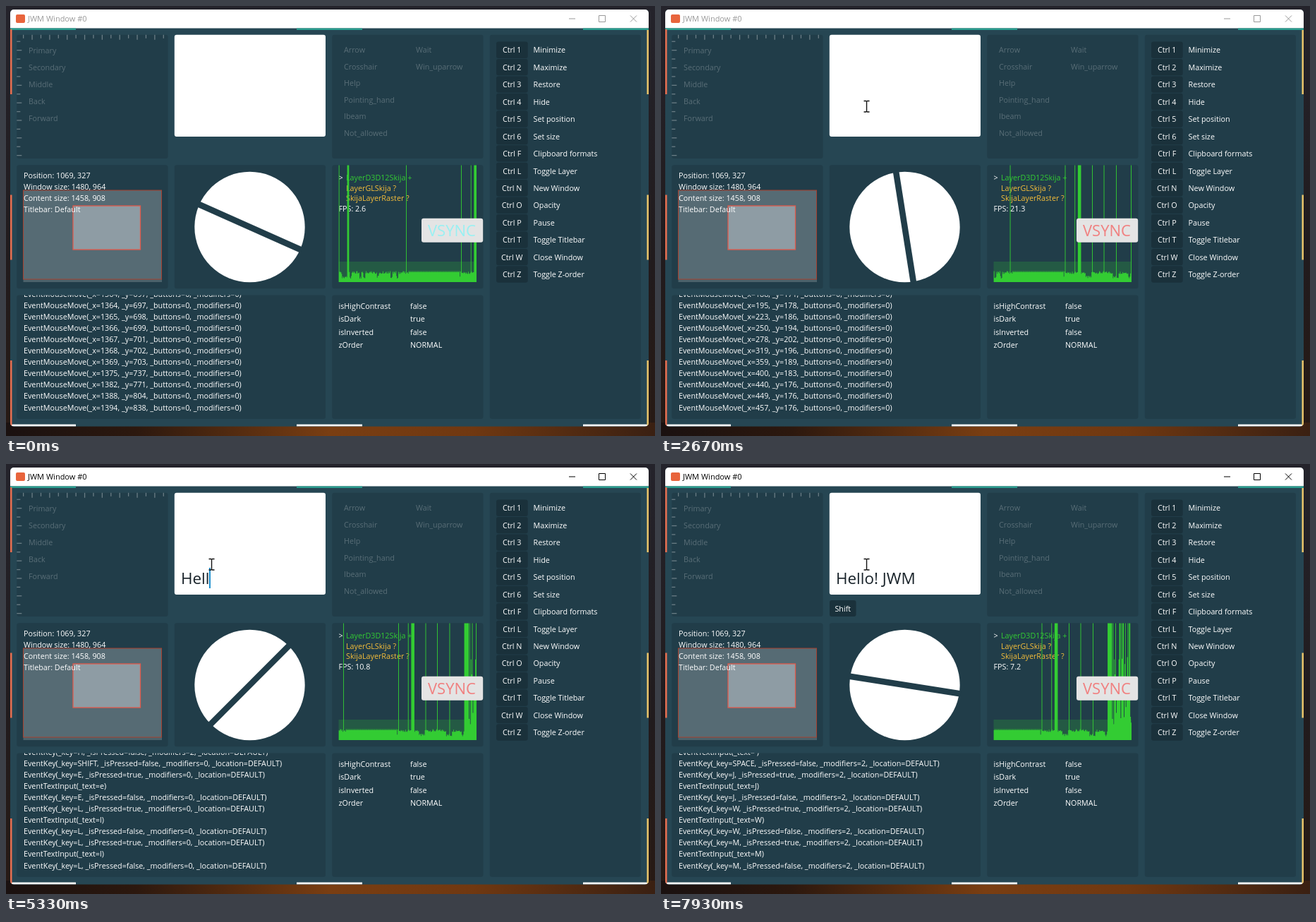
Recreate the animation shown at these times as an HTML page. Size 920 by 609 pixels, loop 8 s.

```html
<!DOCTYPE html>
<html lang="en">
<head>
<meta charset="utf-8">
<title>JWM Window</title>
<style>
html, body { margin: 0; width: 100%; height: 100%; overflow: hidden; background: #1d1c24; }
svg { display: block; }
text { font: 10.75px "Open Sans", "Noto Sans", sans-serif; fill: #fff; white-space: pre; font-variant-ligatures: none; }
.dim text, text.dim { fill-opacity: .25; }
text.big { font-size: 22.4px; }
</style>
</head>
<body>
<svg id="stage" width="920" height="609" viewBox="0 0 920 609"></svg>
<script>
const LOOP = 8000, SCALE = 0.6207, LEFT = 6, TOP = 31.5;
const PANEL = '#213d49', TAG = '#1a313b';
const stage = document.getElementById('stage');

const rect = (x, y, w, h, fill, r = 0, extra = '') =>
  `<rect x="${x}" y="${y}" width="${w}" height="${h}" rx="${r}" fill="${fill}" ${extra}/>`;
const label = (x, y, s, extra = '') => `<text x="${x}" y="${y}" ${extra}>${s}</text>`;
const column = (x, y, step, items) => items.map((s, i) => label(x, y + i * step, s)).join('');
const times = (n, f) => Array.from({ length: n }, (_, i) => f(i)).join('');
const random = k => { const v = Math.sin(k * 12.9898) * 43758.5453; return v - Math.floor(v); };

// Linear interpolation through rows of [position, ...values].
function track(rows, at) {
  let i = 1;
  while (i < rows.length - 1 && rows[i][0] < at) i++;
  const a = rows[i - 1], b = rows[i];
  const p = Math.min(1, Math.max(0, (at - a[0]) / (b[0] - a[0])));
  return a.slice(1).map((v, j) => v + (b[j + 1] - v) * p);
}

// ---- Static window ----
const shortcuts = ['1 Minimize', '2 Maximize', '3 Restore', '4 Hide', '5 Set position', '6 Set size',
  'F Clipboard formats', 'L Toggle Layer', 'N New Window', 'O Opacity', 'P Pause',
  'T Toggle Titlebar', 'W Close Window', 'Z Toggle Z-order'];

const panel = (col, row, cols = 1, rows = 1) => rect(15.3 + col * 223.5, 40.8 + row * 184.4,
  cols * 223.5 - 9.3, rows * 184.4 - 9.3, PANEL, 3);

const edges = times(3, i => {
  const x = 6 + i * 406, y = 33 + i * 234.5;
  return rect(x, TOP, 93, 2.5, '#2a9d8f') + rect(x, 592.5, 93, 3, '#fff') +
    rect(6, y, 2.5, 92, '#e76f51') + rect(908.5, y, 2.5, 92, '#e9c46a');
});

const tick = 20 * SCALE;
const ruler = '<g fill-opacity=".33">' +
  times(17, i => rect(24 + i * tick, 40.8, 1.3, i % 2 ? 7 : 5, '#fff')) +
  times(14, i => rect(15.3, 49.6 + i * tick, i % 2 ? 7 : 5, 1.3, '#fff')) + '</g>';

stage.innerHTML = `
<defs>
  <linearGradient id="sky" x2="0" y2="1">
    <stop offset="0" stop-color="#24232b"/><stop offset=".6" stop-color="#211b1d"/><stop offset="1" stop-color="#281a14"/>
  </linearGradient>
  <linearGradient id="glow">
    <stop offset="0" stop-color="#1a1110"/><stop offset=".2" stop-color="#2c180e"/><stop offset=".5" stop-color="#7a3e12"/>
    <stop offset=".72" stop-color="#703811"/><stop offset="1" stop-color="#3a2012"/>
  </linearGradient>
  <clipPath id="frame"><rect x="6" y="5" width="905" height="590.5" rx="5"/></clipPath>
  <clipPath id="logClip"><rect x="15" y="409.5" width="438" height="175"/></clipPath>
</defs>
${rect(0, 0, 920, 609, 'url(#sky)')}${rect(0, 590, 920, 19, 'url(#glow)')}
<g clip-path="url(#frame)">
  ${rect(6, 5, 905, 591, '#264653')}${rect(6, 5, 905, TOP - 5, '#fff')}${edges}
</g>
${rect(14, 12, 13, 12, '#e8643c', 2)}
<g id="title">
  <text x="31" y="22" style="font-size:11px;fill:currentColor">JWM Window #0</text>
  <path d="M798 18h9M840.5 13.5h9v9h-9zM885 13.5l9 9m0-9l-9 9" fill="none" stroke="currentColor"/>
</g>
${panel(0, 0)}${panel(2, 0)}${panel(0, 1)}${panel(1, 1)}${panel(2, 1)}
${panel(0, 2, 2)}${panel(2, 2)}${panel(3, 0, 1, 3)}
${ruler}
<g class="dim">
  ${column(32, 66.5, 24.15, ['Primary', 'Secondary', 'Middle', 'Back', 'Forward'])}
  ${column(479, 66, 23.6, ['Arrow', 'Crosshair', 'Help', 'Pointing_hand', 'Ibeam', 'Not_allowed'])}
  ${column(581, 66, 23.6, ['Wait', 'Win_uparrow'])}
</g>
<g id="cross">
  <path id="crossLines" fill="none" stroke="#fff" stroke-opacity=".33" stroke-width="2"/>
  <text id="crossLabel" class="dim"></text>
</g>
${rect(238.8, 40.8, 214.2, 144.2, '#fff', 3)}
<text id="typed" class="big" x="248" y="170" style="fill:#182229"></text>
<rect id="caret" y="147" width="2" height="29" fill="#1a8fcf"/>
<g id="tags"></g>
${rect(24.5, 261, 196.5, 130, '#fff', 0, 'fill-opacity=".19"')}
${rect(24.5, 261, 196, 126, '#fff', 0, 'fill-opacity=".06" stroke="#a8412f"')}
${rect(95, 283, 95.5, 62, '#8e9ca4', 0, 'stroke="#e05a4c" stroke-width="1.3"')}
${column(25, 243.5, 16.05, ['Position: 1069, 327', 'Window size: 1480, 964', 'Content size: 1458, 908', 'Titlebar: Default'])}
<circle cx="345.5" cy="313" r="78.2" fill="#fff"/>
<path id="slot" d="M265 313h161" stroke="${PANEL}" stroke-width="8.6"/>
${label(471.5, 246.5, '&gt;')}
${label(482, 246.5, 'LayerD3D12Skija +', 'style="fill:#3c3"')}
${label(482, 261.5, 'LayerGLSkija ?', 'style="fill:#f4bd3a"')}
${label(482, 276.3, 'SkijaLayerRaster ?', 'style="fill:#f4bd3a"')}
<text id="fps" x="471.5" y="291"></text>
${rect(471.5, 362, 195.5, 29, '#3c3', 0, 'fill-opacity=".2"')}
<path id="bars" fill="#3c3"/>
${rect(589, 300.7, 87.2, 34, '#e4e4e4', 3)}
<text id="vsync" class="big" x="598" y="325.5" style="font-size:22px">VSYNC</text>
<g id="log" clip-path="url(#logClip)">${times(11, i => label(25, 412 + i * 16.05, ''))}</g>
${column(471.5, 428.5, 18.65, ['isHighContrast', 'isDark', 'isInverted', 'zOrder'])}
${column(573, 428.5, 18.65, ['false', 'true', 'false', 'NORMAL'])}
${times(shortcuts.length, i => {
    const y = 24.45 * i, s = shortcuts[i];
    return rect(695, 50.5 + y, 44.7, 23.4, TAG, 3) +
      label(717.2, 66.4 + y, 'Ctrl ' + s[0], 'text-anchor="middle"') + label(747.5, 66.4 + y, s.slice(2));
  })}
<path id="arrow" d="M0 0V14.6L3.4 11.4L5.9 17L8.3 16L5.9 10.5H10.6Z" fill="#fff" stroke="#1c2b33" stroke-width=".7"/>
<path id="ibeam" d="M-4 -7.5h3l1 .8l1 -.8h3M0 -7v14.5M-4 8h3l1 -.8l1 .8h3" fill="none" stroke="#111" stroke-width="1.4"/>
`;
const el = {};
stage.querySelectorAll('[id]').forEach(e => { el[e.id] = e; });
const logLines = [...el.log.children];

// ---- Input: pointer path [time, x, y] in window units, then typing ----
const MOVE_STEP = 15, POINTER_LEAD = 60, HEIGHT = 908;
const pointerPath = [[-140, 1364, 697], [-65, 1369, 703], [-5, 1394, 838], [60, 1340, 945], [160, 1310, 890],
  [865, 183, 350], [925, 105, 213], [1000, 33, 113], [1450, 40, 110], [1795, 249, 93], [1930, 129, 114],
  [2065, 195, 178], [2110, 278, 202], [2170, 440, 176], [2200, 457, 176], [2260, 460, 178]];
const pointer = t => track(pointerPath, t);

const events = [];
const emit = (time, text, pos) => events.push({ time, text, pos });
for (let t = 1000 - 77 * MOVE_STEP; t <= 2200; t += MOVE_STEP) {
  const [x, y] = pointer(t).map(Math.round);
  const resting = t > 1190 && t < 1450;
  if (y < HEIGHT && !resting) emit(t, `EventMouseMove(_x=${x}, _y=${y}, _buttons=0, _modifiers=0)`, [x, y]);
}
const button = (t, pressed) =>
  emit(t, `EventMouseButton(_button=PRIMARY, _isPressed=${pressed}, _x=457, _y=176, _modifiers=0)`);
emit(3870, 'EventWindowFocusIn');
button(3870, true);
button(4000, false);

const keyNames = { '!': 'DIGIT1', ' ': 'SPACE' };
const tagNames = { SHIFT: 'Shift', DIGIT1: '1', SPACE: 'Space' };
const type = (chars, start, gap) => [...chars].map((char, i) => ({
  name: keyNames[char] || char.toUpperCase(), char, down: start + i * gap, up: start + i * gap + 130
}));
const shift = (down, up) => ({ name: 'SHIFT', char: '', down, up });
const keys = [shift(4200, 4600), ...type('Hell', 4400, 265), shift(5670, LOOP),
  ...type('o! ', 5460, 300), ...type('JWM', 7130, 300)];
const held = t => keys.filter(k => k.down <= t && t < k.up);
const keyText = (name, pressed, t) => `EventKey(_key=${name}, _isPressed=${pressed}, ` +
  `_modifiers=${held(t).some(k => k.name === 'SHIFT') ? 2 : 0}, _location=DEFAULT)`;
for (const { name, char, down, up } of keys) {
  emit(down, keyText(name, true, down));
  if (char) emit(down, `EventTextInput(_text=${char})`);
  emit(up, keyText(name, false, up));
}
events.sort((a, b) => a.time - b.time);

// ---- Redraws: the app repaints only on input or caret blink ----
const BLINK = 500, BLINK_START = 170, CAPTURE = 62;
const redraws = [0];
for (let t = 1000 - 16 * CAPTURE; t < 2300; t += CAPTURE) {
  if (events.some(e => e.time > Math.max(0, t - CAPTURE) && e.time <= t)) redraws.push(t);
}
for (let t = BLINK_START; t < LOOP; t += BLINK) if (t > 2000) redraws.push(t);
events.forEach(e => { if (e.time > 2200) redraws.push(e.time); });
redraws.sort((a, b) => a - b);

// [time, frames painted, frames per second]
const pace = [[100, 0, 2.6], [1000, 36, 28], [1930, 62, 30], [2200, 78, 30],
  [3670, 82, 2.9], [5330, 97, 10.8], [6670, 107, 6.8], [7930, 115, 7.2]];

// ---- Frame time chart ----
const FULL = 165.5, PITCH = 0.917, IDLE_FROM = 78;
const isSpike = k => Math.abs(k + 1) <= 2 || Math.abs(k + 198) <= 1 ||
  [-212, -108, -23, -8].includes(k) || (k > 0 && k < 60 && k % 18.5 < 1);
function barHeight(k) {
  const r = random(k);
  if (isSpike(k)) return FULL;
  if (k > IDLE_FROM) return k < 84 || r < 0.4 ? FULL : 14 + (r - 0.4) * 190;
  if (k > -105 && k < -25) return 15.5 - (k & 1) * 1.5;
  return random(Math.floor(k / 3) + 500) < 0.3 ? 5 + 4 * r : 11.5 + 4 * r;
}
const chartPath = count => 'M667 391' + times(213, i =>
  `V${(391 - barHeight(count - i)).toFixed(1)}H${(667 - (i + 1) * PITCH).toFixed(2)}`) + 'V391Z';

// ---- Painting ----
const show = (node, on) => node.setAttribute('visibility', on ? 'visible' : 'hidden');

function drawCross([x, y]) {
  const inside = x > 15 && x < 360 && y > 15 && y < 297;
  show(el.cross, inside);
  if (!inside) return;
  const px = LEFT + x * SCALE, py = TOP + y * SCALE;
  el.crossLines.setAttribute('d', `M${px} 41V216M15 ${py}H229.5`);
  el.crossLabel.setAttribute('x', px + 4);
  el.crossLabel.setAttribute('y', py - 4.2);
  el.crossLabel.textContent = `${x - 15}, ${y - 15}`;
}

function drawTags(t) {
  let x = 239;
  el.tags.innerHTML = held(t).sort((a, b) => a.down - b.down).map(({ name }) => {
    const s = tagNames[name] || name, w = 14 + s.length * 4.7;
    const tag = rect(x, 193, w, 23, TAG, 3) + label(x + w / 2, 208.5, s, 'text-anchor="middle"');
    x += w + 6;
    return tag;
  }).join('');
}

function repaint(time) {
  const [painted, fps] = track(pace, time);
  const count = Math.round(painted);
  const past = events.filter(e => e.time <= time);
  past.slice(-11).forEach((e, i) => { logLines[i].textContent = e.text; });
  drawCross(past.filter(e => e.pos).pop().pos);
  drawTags(time);

  el.typed.textContent = keys.filter(k => k.down <= time).map(k => k.char).join('');
  el.caret.setAttribute('x', 248 + (el.typed.textContent ? el.typed.getComputedTextLength() - 0.5 : 0));
  show(el.caret, time >= BLINK_START && Math.floor((time - BLINK_START) / BLINK) % 2 === 0);

  el.slot.setAttribute('transform', `rotate(${24 + 3 * count} 345.5 313)`);
  el.vsync.style.fill = count % 2 ? '#f08080' : '#99f0f2';
  el.fps.textContent = 'FPS: ' + fps.toFixed(1);
  el.bars.setAttribute('d', chartPath(count));
  el.title.style.color = time >= 3870 ? '#000' : '#999';
}

let shown = null;
function draw(now) {
  const t = now % LOOP;
  const current = redraws.filter(r => r <= t).pop();
  if (current !== shown) repaint(shown = current);

  const [wx, wy] = pointer(t + POINTER_LEAD);
  const x = LEFT + wx * SCALE, y = TOP + wy * SCALE;
  const overInput = x > 239 && x < 453 && y < 185;
  show(el.arrow, !overInput);
  show(el.ibeam, overInput);
  (overInput ? el.ibeam : el.arrow).setAttribute('transform', `translate(${x} ${y})`);
}

const start = performance.now();
(function loop() {
  draw(performance.now() - start);
  requestAnimationFrame(loop);
})();
</script>
</body>
</html>
```
